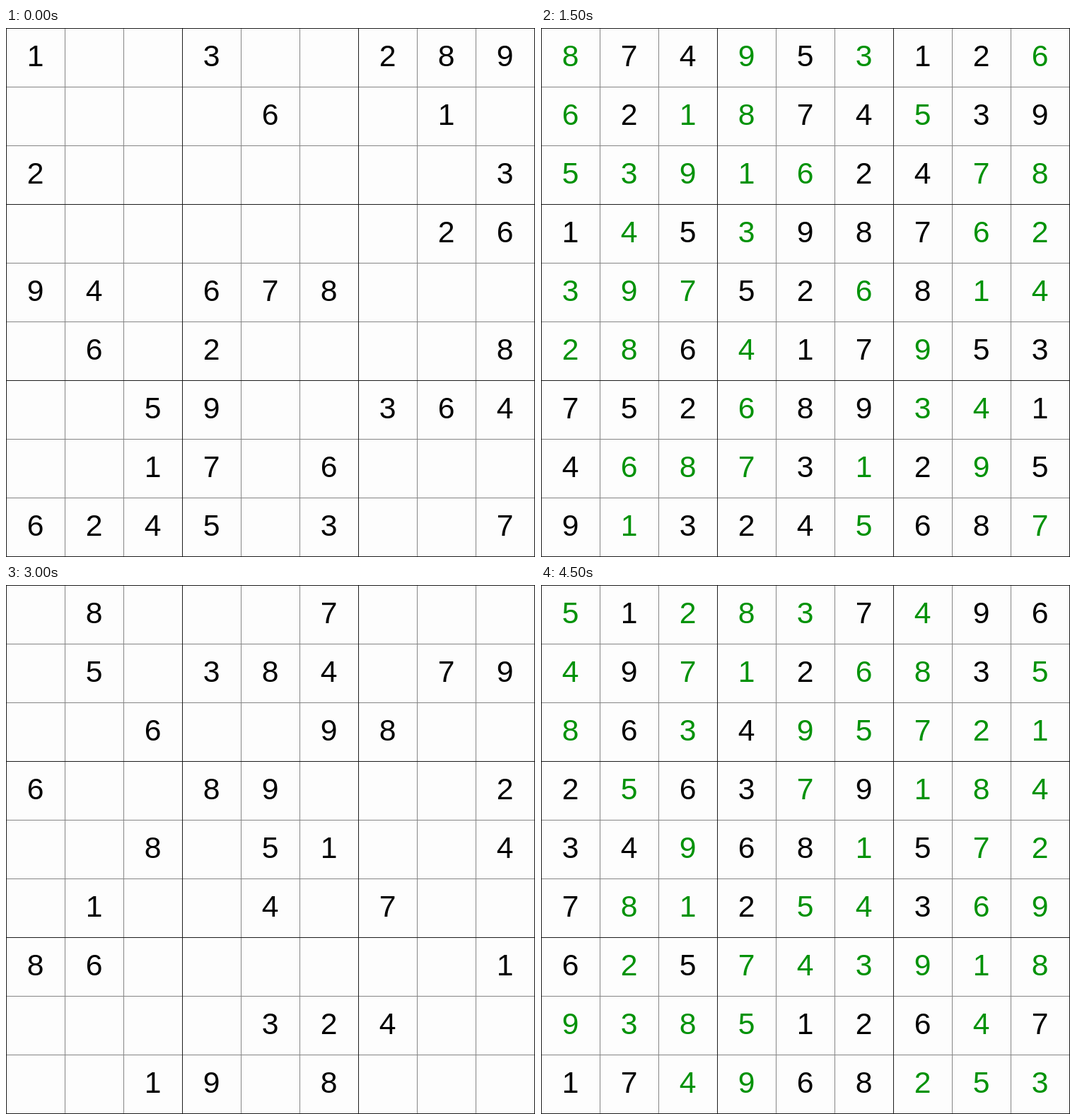
Recreate the animation shown at these times as an HTML page. Size 748 by 748 pixels, loop 5 s.

```html
<!DOCTYPE html>
<html lang="en">
<head>
<meta charset="utf-8">
<title>Sudoku solver</title>
<style>
  html, body { margin: 0; width: 100%; height: 100%; overflow: hidden; background: #fdfdfd; }
  svg { display: block; width: 748px; height: 748px; }
  text { font: 42.67px "Liberation Sans", Arial, sans-serif; text-anchor: middle; }
  .thin { fill: #858585; }
  .thick { fill: #1c1c1c; }
  .board, .answers { opacity: 0; animation: 5s step-end infinite; }
  .board { animation-name: board; }
  .answers { animation-name: answers; fill: #009207; }
  @keyframes board { 0% { opacity: 1; } 20%, 100% { opacity: 0; } }
  @keyframes answers { 0% { opacity: 0; } 10% { opacity: 1; } 20%, 100% { opacity: 0; } }
</style>
</head>
<body>
<svg viewBox="0 0 748 748"></svg>
<script>
const CELL = 83, SIZE = 748;
const puzzles = [
  "1..3..289 ....6..1. 2.......3 .......26 94.678... .6.2....8 ..59..364 ..17.6... 6245.3..7",
  ".74.5.12. .2..74.39 .....24.. 1.5.987.. ...52.8.. ..6.17.53 752.89..1 4...3.2.5 9.324.68.",
  "9..8.3216 ....1..89 ....2.... .57..4... 49...51.7 8.2.....5 7.6..25.. .4......2 .28.3.94.",
  ".8...7... .5.384.79 ..6..98.. 6..89...2 ..8.51..4 .1..4.7.. 86......1 ....324.. ..19.8...",
  ".1...7.96 .9..2..3. .6.4..... 2.63.9... 34.68.5.. 7..2..3.. 6.5...... ....126.7 17..68..."
].map(rows => [...rows.replace(/ /g, "")].map(c => +c || 0));

const row = i => Math.floor(i / 9);
const col = i => i % 9;
const box = i => Math.floor(row(i) / 3) * 3 + Math.floor(col(i) / 3);

function candidates(grid, cell) {
  const used = new Set(grid.filter((_, i) =>
    row(i) === row(cell) || col(i) === col(cell) || box(i) === box(cell)));
  return [1, 2, 3, 4, 5, 6, 7, 8, 9].filter(d => !used.has(d));
}

// Backtracking, always filling the most constrained empty cell.
function solve(grid) {
  let best = -1, options = null;
  for (let i = 0; i < 81; i++) {
    if (grid[i]) continue;
    const found = candidates(grid, i);
    if (!options || found.length < options.length) [best, options] = [i, found];
    if (options.length < 2) break;
  }
  if (!options) return grid;
  for (const digit of options) {
    const next = grid.slice();
    next[best] = digit;
    const solved = solve(next);
    if (solved) return solved;
  }
  return null;
}

const digitText = (digit, i) =>
  `<text x="${col(i) * CELL + 41.5}" y="${row(i) * CELL + 54}">${digit}</text>`;

function gridLines(kind, wanted) {
  let out = "";
  for (let i = 0; i <= 9; i++) {
    if (!wanted(i)) continue;
    const p = i * CELL;
    out += `<rect class="${kind}" x="${p}" width="1" height="${SIZE}"/>` +
           `<rect class="${kind}" y="${p}" width="${SIZE}" height="1"/>`;
  }
  return out;
}

function board(clues, index) {
  const delay = `style="animation-delay:${index ? index - 5 : 0}s"`;
  const solved = solve(clues) || clues;
  const given = clues.map((d, i) => d ? digitText(d, i) : "").join("");
  const answers = solved.map((d, i) => d && !clues[i] ? digitText(d, i) : "").join("");
  return `<g class="board" ${delay}>${given}<g class="answers" ${delay}>${answers}</g></g>`;
}

document.querySelector("svg").innerHTML =
  gridLines("thin", i => i % 3) + gridLines("thick", i => i % 3 === 0) +
  puzzles.map(board).join("");
</script>
</body>
</html>
```
